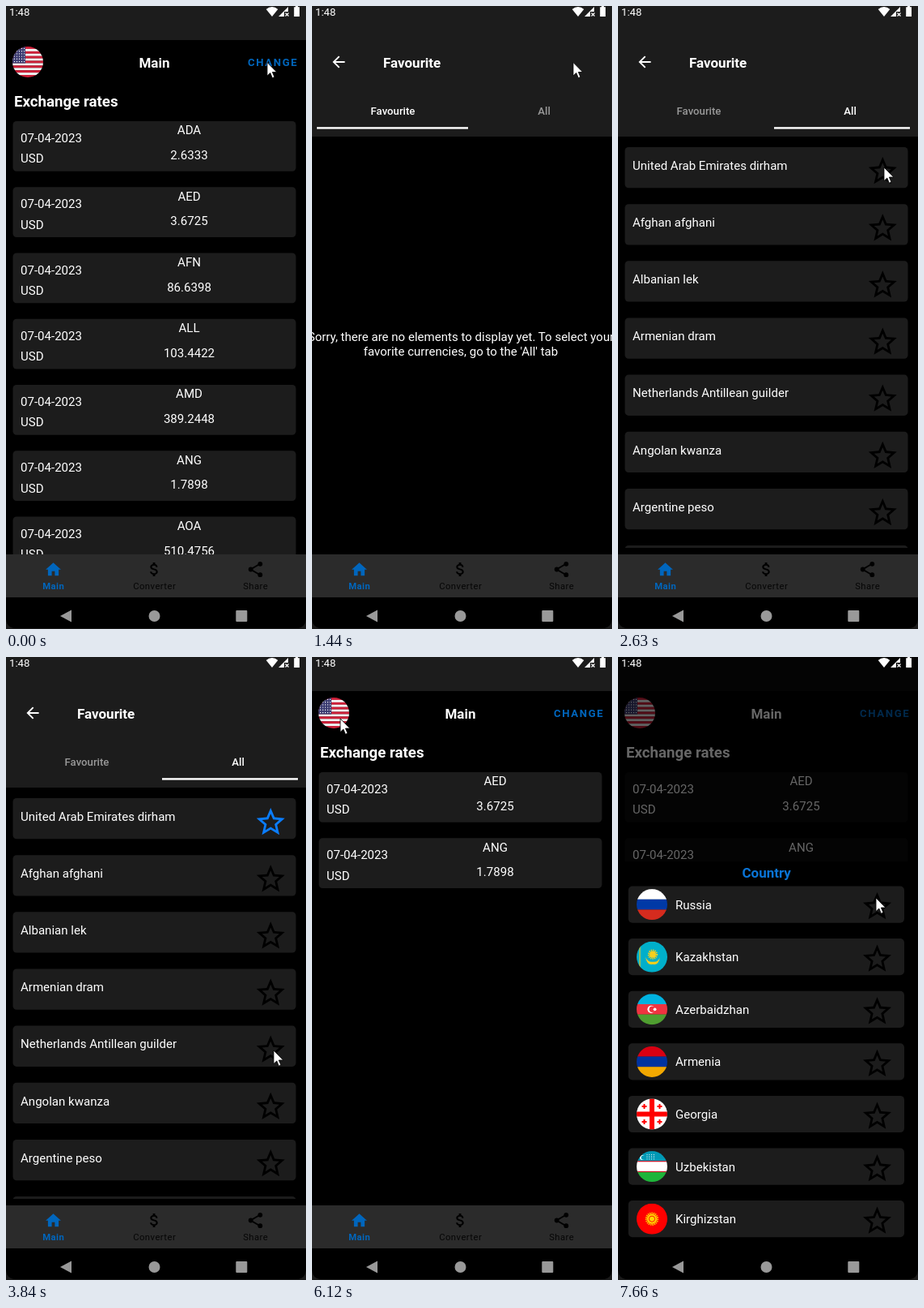
Animation of 371x768 px, one loop 8000 ms. Source, as an HTML page:

```html
<!DOCTYPE html>
<html lang="en">
<head>
<meta charset="utf-8">
<title>Currency app</title>
<style>
html, body { margin: 0; width: 100%; height: 100%; overflow: hidden; background: #000; }
svg { display: block; width: 371px; height: 768px; }
text { font-family: Roboto, sans-serif; font-size: 15.05px; fill: #fff; }
.b { font-weight: 700; }
.h { font-size: 17px; font-weight: 700; }
.tab { font-size: 13.2px; font-weight: 500; }
.nav { font-size: 11.3px; letter-spacing: .45px; }
.m { text-anchor: middle; }
</style>
</head>
<body>
<svg id="stage" viewBox="0 0 371 768"></svg>
<script>
const LOOP = 8000, BLUE = '#0066bd', DARK = '#1c1c1c';

// moments at which the screen refreshes
const TICKS = [0, 1300, 1440, 1560, 1690, 1800, 2360, 2500, 2630, 3170, 3290, 3420, 3570,
  3710, 3840, 4090, 4210, 4330, 4470, 4600, 4750, 5030, 5420, 5560, 5690, 6120, 6520,
  6640, 6760, 6910, 7060, 7180, 7300, 7420, 7540, 7660];

// pointer path: time, x, y
const POINTER = [[0, 323, 69.5], [1440, 323, 69.5], [1800, 312, 158], [2500, 312, 158],
  [2630, 329, 199], [3170, 329, 199], [3420, 331, 342], [3570, 331, 402], [3840, 331, 485],
  [4090, 331, 485], [4330, 22, 204], [4470, 17, 140], [4600, 14, 100], [4750, 19, 85],
  [5030, 34, 71.5], [5560, 34, 71.5], [5690, 36, 79], [6120, 35, 76], [6640, 35, 76],
  [6760, 136, 126], [7060, 307, 184], [7180, 314, 235], [7420, 319, 297]];

const clamp = v => Math.max(0, Math.min(1, v));
const easeOut = k => 1 - (1 - k) ** 3;
const ramp = (t, from, span) => clamp((t - from) / span);

const text = (x, y, s, cls = '', extra = '') => `<text x="${x}" y="${y}" class="${cls}" ${extra}>${s}</text>`;
const rect = (x, y, w, h, fill, extra = '') =>
  `<rect x="${x}" y="${y}" width="${w}" height="${h}" fill="${fill}" ${extra}/>`;
const circle = (x, y, r, fill, extra = '') => `<circle cx="${x}" cy="${y}" r="${r}" fill="${fill}" ${extra}/>`;
const path = (d, fill, extra = '') => `<path d="${d}" fill="${fill}" ${extra}/>`;
const at = (x, y, s, extra = '') => `<g transform="translate(${x} ${y})" ${extra}>${s}</g>`;
const icon = (x, y, d, fill) => path(d, fill, `transform="translate(${x} ${y}) scale(.945) translate(-12 -12)"`);

const STAR = 'M22 9.24l-7.19-.62L12 2 9.19 8.63 2 9.24l5.46 4.73L5.82 21 12 17.27 18.18 21l-1.63-7.03z' +
  'M12 15.4l-3.76 2.27 1-4.28-3.32-2.88 4.38-.38L12 6.1l1.71 4.04 4.38.38-3.32 2.88 1 4.28z';
const star = (x, y, cls = '') =>
  path(STAR, '#000', `class="${cls}" transform="translate(${x - 21} ${y - 3.5}) scale(1.75)"`);

// ---- flags, centred on 0,0 with radius 19
const flag = (x, y, s) => at(x, y, `<g clip-path="url(#round)">${s}</g>`);
const bands = colors => colors.map((c, i) =>
  rect(-19, -19 + i * 38 / colors.length, 38, 38 / colors.length + .1, c)).join('');
const dots = (cols, rows, x, y, dx, dy, r) => Array.from({ length: cols * rows }, (_, i) =>
  circle(x + i % cols * dx, y + Math.floor(i / cols) * dy, r, '#fff')).join('');
const sun = (r, fill) => circle(0, 0, r, fill) +
  circle(0, 0, r + 1, 'none', `stroke="${fill}" stroke-width="2.4" stroke-dasharray="1.3 1"`);
const cross = (x, y) => rect(x - 3, y - 1, 6, 2, '#f00') + rect(x - 1, y - 3, 2, 6, '#f00');

const usa = bands(Array.from({ length: 13 }, (_, i) => i % 2 ? '#f4f4f4' : '#cf1f38')) +
  rect(-19, -19, 16, 20.5, '#3a3a70') + dots(5, 6, -16.5, -16.5, 3, 3.2, .7);

const COUNTRIES = [
  ['Russia', bands(['#fff', '#0039a6', '#d52b1e'])],
  ['Kazakhstan', rect(-19, -19, 38, 38, '#00afca') + rect(-16, -19, 2, 38, '#c9c23c', 'opacity=".7"') +
    at(1, -3, sun(4, '#f5cf1c')) + path('M-8 0Q-5 7 1 6Q8 7 10 0Q8 11 1 9Q-6 11 -8 0Z', '#f5cf1c')],
  ['Azerbaidzhan', bands(['#00b2e0', '#ef3340', '#4f9e30']) + circle(-1, 0, 4.6, '#fff') +
    circle(.4, 0, 3.8, '#ef3340') + circle(3.6, 0, 1.9, '#fff')],
  ['Armenia', bands(['#d90012', '#0033a0', '#f2a800'])],
  ['Georgia', rect(-19, -19, 38, 38, '#fff') + rect(-19, -3, 38, 6, '#f00') + rect(-3, -19, 6, 38, '#f00') +
    [-9.5, 9.5].map(x => cross(x, -9.5) + cross(x, 9.5)).join('')],
  ['Uzbekistan', bands(['#0099b5', '#fff', '#1eb53a']) + rect(-19, -7, 38, 1.2, '#ce1126') +
    rect(-19, 5.8, 38, 1.2, '#ce1126') + circle(-12, -11, 3, '#fff') + circle(-10.8, -11, 2.6, '#0099b5') +
    dots(4, 3, -6, -14.5, 2.8, 2.6, .6)],
  ['Kirghizstan', rect(-19, -19, 38, 38, '#f00') + sun(6, '#ffd400') +
    circle(0, 0, 3.6, 'none', 'stroke="#f00" stroke-width=".9"')]
];

// ---- screens
const RATES = [['ADA', '2.6333'], ['AED', '3.6725'], ['AFN', '86.6398'], ['ALL', '103.4422'],
  ['AMD', '389.2448'], ['ANG', '1.7898'], ['AOA', '510.4756']];
const NAMES = ['United Arab Emirates dirham', 'Afghan afghani', 'Albanian lek', 'Armenian dram',
  'Netherlands Antillean guilder', 'Angolan kwanza', 'Argentine peso', ''];

const rateRow = ([code, rate], i) => at(0, 142 + i * 81.25,
  rect(8.5, 0, 350, 61.7, DARK, 'rx="4.5" class="shade"') + text(18, 26, '07-04-2023') + text(18, 51.3, 'USD') +
  text(226.5, 16.3, code, 'm') + text(226.5, 47.2, rate, 'm'));
const nameRow = (name, i) => at(0, 174 + i * 70.15,
  rect(8.5, 0, 350, 50.3, DARK, 'rx="4.5"') + text(18, 27.8, name) + star(327.3, 12, 'fav' + i));
const countryRow = ([name, art], i) => at(0, 282.5 + i * 64.6,
  rect(12.8, 0, 341.2, 45.2, DARK, 'rx="5"') + flag(42, 22.6, art) + text(71, 28, name) + star(320.5, 7.5));

const mainPage = flag(27, 69, usa) + circle(27, 69, 19, '#fff', 'id="press" opacity=".25"') +
  rect(287, 52, 84, 35, BLUE, 'rx="4" id="tap" opacity=".25"') +
  text(183.5, 76, 'Main', 'h m') +
  text(299, 74.4, 'CHANGE', 'b', `style="font-size:13.2px;letter-spacing:1.6px;fill:${BLUE}"`) +
  text(10, 124, 'Exchange rates', 'b', 'style="font-size:18.7px"') +
  `<g id="allRates">${RATES.map(rateRow).join('')}</g>` +
  `<g id="favRates">${[RATES[1], RATES[5]].map(rateRow).join('')}</g>`;

const favPage = rect(0, 42, 371, 119, DARK) +
  `<g clip-path="url(#tabs)">${circle(302, 128.5, 111, '#2f2f2f', 'id="ripple"')}</g>` +
  icon(33, 69, 'M20 11H7.83l5.59-5.59L12 4l-8 8 8 8 1.41-1.41L7.83 13H20z', '#fff') +
  text(88, 76, 'Favourite', 'h') +
  text(100, 133.7, 'Favourite', 'tab m', 'id="tabFav"') + text(287, 133.7, 'All', 'tab m', 'id="tabAll"') +
  `<g clip-path="url(#bar)">${rect(6, 149.2, 187, 2.4, '#fff', 'id="line"')}</g>` +
  `<g id="empty">${text(184, 413, 'Sorry, there are no elements to display yet. To select your', 'm')}` +
  text(184, 431, "favorite currencies, go to the 'All' tab", 'm') + '</g>' +
  `<g id="names" clip-path="url(#list)">${NAMES.map(nameRow).join('')}</g>`;

const DOLLAR = 'M11.8 10.9c-2.27-.59-3-1.2-3-2.15 0-1.09 1.01-1.85 2.7-1.85 1.78 0 2.44.85 2.5 2.1h2.21' +
  'c-.07-1.72-1.12-3.3-3.21-3.81V3h-3v2.16c-1.94.42-3.5 1.68-3.5 3.61 0 2.31 1.91 3.46 4.7 4.13 2.5.6 3 1.48 3 2.41' +
  ' 0 .69-.49 1.79-2.7 1.79-2.06 0-2.87-.92-2.98-2.1h-2.2c.12 2.19 1.76 3.42 3.68 3.83V21h3v-2.15' +
  'c1.95-.37 3.5-1.5 3.5-3.55 0-2.84-2.43-3.81-4.7-4.4z';
const share = at(308.5, 694.5, path('M6 -7L-6 0L6 7', 'none', 'stroke="#000" stroke-width="2"') +
  circle(-5.8, 0, 2.9, '#000') + circle(5.8, -6.7, 2.9, '#000') + circle(5.8, 6.7, 2.9, '#000'));
const bottomNav = rect(0, 676, 371, 53, '#2b2b2b') +
  icon(58.5, 694.8, 'M10 20v-6h4v6h5v-8h3L12 3 2 12h3v8z', BLUE) + icon(183.5, 694.5, DOLLAR, '#000') + share +
  text(58.7, 719.4, 'Main', 'nav b m', `style="fill:${BLUE}"`) +
  text(183.7, 719.4, 'Converter', 'nav m', 'style="fill:#060606"') +
  text(308.7, 719.4, 'Share', 'nav m', 'style="fill:#060606"');

const sheet = rect(0, 252, 371, 516, '#000') +
  text(183.7, 272, 'Country', 'h m', 'style="fill:#0a74d6"') + COUNTRIES.map(countryRow).join('');

const systemBars = rect(0, 729, 371, 39, '#000') +
  path('M0 756Q1 767 12 767H359Q370 767 371 756V768H0Z', '#1a1a1a') +
  path('M67 752L81 744.5V759.5Z', '#999') + circle(183.5, 752, 7, '#999') +
  rect(284.3, 745, 14, 14, '#999', 'rx="1"') +
  text(4, 12, '1:48', '', 'style="font-size:13.2px"') +
  path('M329 13L321.7 4Q329 -1.8 336.3 4Z', '#fff') +
  path('M349 1V7H344V13H337Z', '#fff') +
  path('M345.5 8.5L349.5 12.5M349.5 8.5L345.5 12.5', 'none', 'stroke="#fff" stroke-width="1.2"') +
  path('M358 0H361V1.3H363V13H356.2V1.3H358Z', '#fff');

const clip = (id, shape) => `<clipPath id="${id}">${shape}</clipPath>`;
const svg = document.getElementById('stage');
svg.innerHTML = '<defs>' + clip('round', circle(0, 0, 19, '#fff')) + clip('tabs', rect(180, 96, 191, 65, '#fff')) +
  clip('bar', rect(6, 140, 355, 20, '#fff')) + clip('list', rect(0, 161, 371, 507, '#fff')) + '</defs>' +
  rect(0, 0, 371, 768, '#000') + rect(0, 0, 371, 42, DARK, 'class="shade"') +
  `<g id="fav">${favPage}</g><g id="main">${mainPage}</g>` + bottomNav +
  rect(0, 0, 371, 768, '#000', 'id="dim"') + `<g id="sheet">${sheet}</g>` + systemBars +
  `<g id="pointer">${path('M0 0V16.6L3.8 13L6.4 19.2L9 18.1L6.4 12H11.8Z', '#fff', 'stroke="#000" stroke-width=".8"')}</g>`;

const $ = id => document.getElementById(id);
const show = (id, on) => { $(id).style.display = on ? '' : 'none'; };
const fade = (id, v) => { $(id).style.opacity = v; show(id, v > 0); };
const move = (id, x, y) => $(id).setAttribute('transform', `translate(${x} ${y})`);
const tint = (sel, c) => { svg.querySelector(sel).style.fill = c; };
const shades = [...svg.querySelectorAll('.shade')];

function pointerAt(t) {
  const n = POINTER.findIndex(p => p[0] > t);
  if (n < 0) return POINTER[POINTER.length - 1].slice(1);
  const [t0, x0, y0] = POINTER[n - 1], [t1, x1, y1] = POINTER[n];
  const k = (t - t0) / (t1 - t0);
  return [x0 + (x1 - x0) * k, y0 + (y1 - y0) * k];
}

function draw(time) {
  const t = TICKS.filter(v => v <= time).pop();

  // cross-fade between the two screens
  const back = ramp(t, 5380, 180);
  fade('fav', t < 1440 ? 0 : clamp(1 - ramp(t, 5330, 300)));
  fade('main', t < 1440 ? 1 : t < 5420 ? 0 : back);
  show('allRates', t < 1440);
  show('favRates', t >= 5420);
  show('tap', t === 1300);
  show('press', t >= 6520 && t < 6760);

  // tab switch
  const swipe = t < 2360 ? 0 : t >= 2630 ? 1 : easeOut(ramp(t, 2310, 298));
  $('line').setAttribute('x', 6 + 187 * swipe);
  move('empty', -371 * swipe, 0);
  show('empty', t < 2500);
  show('names', t >= 2630);
  show('ripple', t >= 2360 && t < 2630);
  $('ripple').setAttribute('r', t < 2500 ? 50 : 111);
  tint('#tabFav', t < 2360 ? '#fff' : '#999');
  tint('#tabAll', t < 2360 ? '#999' : '#fff');
  tint('.fav0', t >= 3170 ? '#0a7dff' : '#000');
  tint('.fav4', t >= 4090 ? '#0a7dff' : '#000');

  // country sheet
  const dim = ramp(t, 6910, 250);
  fade('dim', .6 * dim);
  shades.forEach(s => { s.style.opacity = 1 - .65 * dim; });
  show('sheet', t >= 6910);
  move('sheet', 0, 477 * (1 - easeOut(ramp(t, 6890, 290))));

  move('pointer', ...pointerAt(t));
}

function loop(now) {
  draw(now % LOOP);
  requestAnimationFrame(loop);
}
draw(0);
requestAnimationFrame(loop);
</script>
</body>
</html>
```
